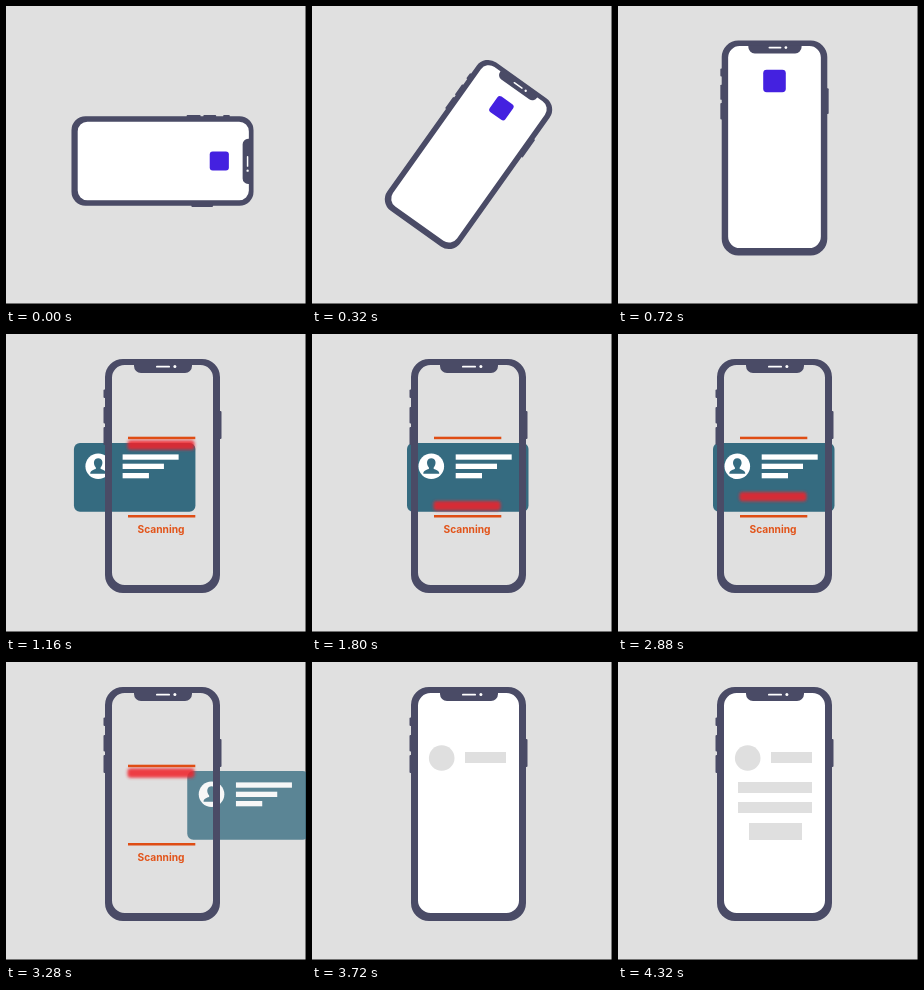
Recreate the animation shown at these times as an HTML page. Size 300 by 300 pixels, loop 4560 ms.

```html
<!DOCTYPE html>
<html lang="en">
<head>
<meta charset="utf-8">
<title>Card scan</title>
<style>
  html, body { margin: 0; width: 100%; height: 100%; overflow: hidden; background: #e0e0e0; }
  svg { display: block; width: 100%; height: 100%; }
  text { font: 700 10.2px Inter, "Open Sans", sans-serif; fill: #e2541a; text-anchor: middle; }
  .body { fill: #4a4b66; }
  .line { fill: #df4d14; }
  #form { fill: #dfdfdf; }
</style>
</head>
<body>
<svg viewBox="0 0 300 300">
  <defs>
    <filter id="blur" x="-20%" y="-150%" width="140%" height="400%">
      <feGaussianBlur stdDeviation="1.7"/>
    </filter>
  </defs>
  <rect width="300" height="300" fill="#e0e0e0"/>
  <rect x="299" width="1" height="300" fill="#777"/>
  <rect y="297.5" width="300" height="2.5"/>

  <!-- phone parts are centred on 0,0 -->
  <g class="phone">
    <g id="screen">
      <rect x="-52" y="-112" width="104" height="224" rx="13" fill="#fff"/>
      <rect id="icon" x="-12.3" y="-85.3" width="24.6" height="24.6" rx="3.8" fill="#4421e0"/>
    </g>
  </g>

  <g id="card">
    <rect y="109" width="121.5" height="68.7" rx="6" fill="#356b80"/>
    <g fill="#fff">
      <circle cx="24.3" cy="132.3" r="12.8"/>
      <rect x="48.7" y="120.4" width="56" height="5.3"/>
      <rect x="48.7" y="129.7" width="41.3" height="5.3"/>
      <rect x="48.7" y="139" width="26.3" height="5.3"/>
    </g>
    <path d="M16.3 139.8c0-3 2.400-3.800 5.600-4.800v-1.600c-3.500-4-1.800-9.200 2.400-9.200s5.900 5.200 2.400 9.200v1.600c3.200 1 5.600 1.800 5.600 4.800z" fill="#356b80"/>
  </g>

  <g id="scan">
    <rect id="beam" x="121.500" y="-4.700" width="67" height="9.400" rx="3" fill="#f0202c" opacity=".86" filter="url(#blur)"/>
    <rect class="line" x="122" y="102.700" width="67.300" height="2.500"/>
    <rect class="line" x="122" y="181" width="67.300" height="2.500"/>
    <text x="155" y="199">Scanning</text>
  </g>

  <g class="phone">
    <path class="body" fill-rule="evenodd" d="M-39.500-117h79a18 18 0 0 1 18 18v198a18 18 0 0 1-18 18h-79a18 18 0 0 1-18-18v-198a18 18 0 0 1 18-18z
      M-38-111a12.500 12.500 0 0 0-12.500 12.500v195a12.500 12.500 0 0 0 12.500 12.500h76a12.500 12.500 0 0 0 12.500-12.500v-195a12.500 12.500 0 0 0-12.500-12.500z"/>
    <path class="body" d="M-28.500-112h58v2a7 7 0 0 1-7 7h-44a7 7 0 0 1-7-7z"/>
    <g class="body">
      <rect x="-59" y="-86.500" width="3" height="8.500" rx="1"/>
      <rect x="-59" y="-69" width="3" height="16.500" rx="1"/>
      <rect x="-59" y="-49" width="3" height="18" rx="1"/>
      <rect x="56" y="-65" width="3" height="28" rx="1"/>
    </g>
    <g fill="#fff">
      <rect x="-6.500" y="-110.300" width="14" height="1.900" rx=".9"/>
      <circle cx="12.400" cy="-109.400" r="1.500"/>
    </g>
  </g>

  <g id="form">
    <rect data-at="3560" x="153" y="90" width="41" height="11"/>
    <circle data-at="3720" cx="129.700" cy="96" r="12.800"/>
    <rect data-at="3920" x="120" y="120" width="74" height="11"/>
    <rect data-at="4080" x="120" y="140" width="74" height="11"/>
    <rect data-at="4320" x="131" y="161" width="53" height="17"/>
  </g>
</svg>
<script>
  const LOOP = 4560, STEP = 40;
  const $ = id => document.getElementById(id);
  const phones = document.querySelectorAll('.phone');
  const fields = document.querySelectorAll('[data-at]');

  const ramp = (t, a, b) => Math.min(1, Math.max(0, (t - a) / (b - a)));
  const ease = (t, a, b) => { const u = ramp(t, a, b); return u * u * (3 - 2 * u); };
  const set = (el, name, value) => el.setAttribute(name, value);

  function draw(t) {
    const angle = 90 * (1 - ease(t, 0, 560));
    const scale = 0.778 + 0.222 * ease(t, 320, 1000);
    const y = 155 - 13 * ease(t, 0, 640);
    phones.forEach(p => set(p, 'transform', `translate(156.5 ${y}) rotate(${angle}) scale(${scale})`));

    set($('screen'), 'opacity', 1 - ramp(t, 840, 1000) + ramp(t, 3280, 3360));
    set($('icon'), 'opacity', t < 1000 ? 1 : 0);

    const x = 20 + 75 * ease(t, 970, 1290) + 110 * ease(t, 3000, 3400);
    set($('card'), 'transform', `translate(${x})`);
    set($('card'), 'opacity', ramp(t, 960, 1080) * (1 - ramp(t, 3245, 3400)));

    // two full sweeps, resting at the top before and after
    const sweep = ramp(t, 1240, 3240) * 4 * Math.PI;
    set($('beam'), 'transform', `translate(0 ${142.5 - 31.5 * Math.cos(sweep)})`);
    set($('scan'), 'opacity', ramp(t, 1000, 1160) * (1 - ramp(t, 3280, 3400)));

    fields.forEach(f => set(f, 'visibility', t >= +f.dataset.at ? 'visible' : 'hidden'));
  }

  const start = performance.now();
  function tick() {
    const t = (performance.now() - start) % LOOP;
    draw(Math.floor(t / STEP) * STEP);
    requestAnimationFrame(tick);
  }
  tick();
</script>
</body>
</html>
```
